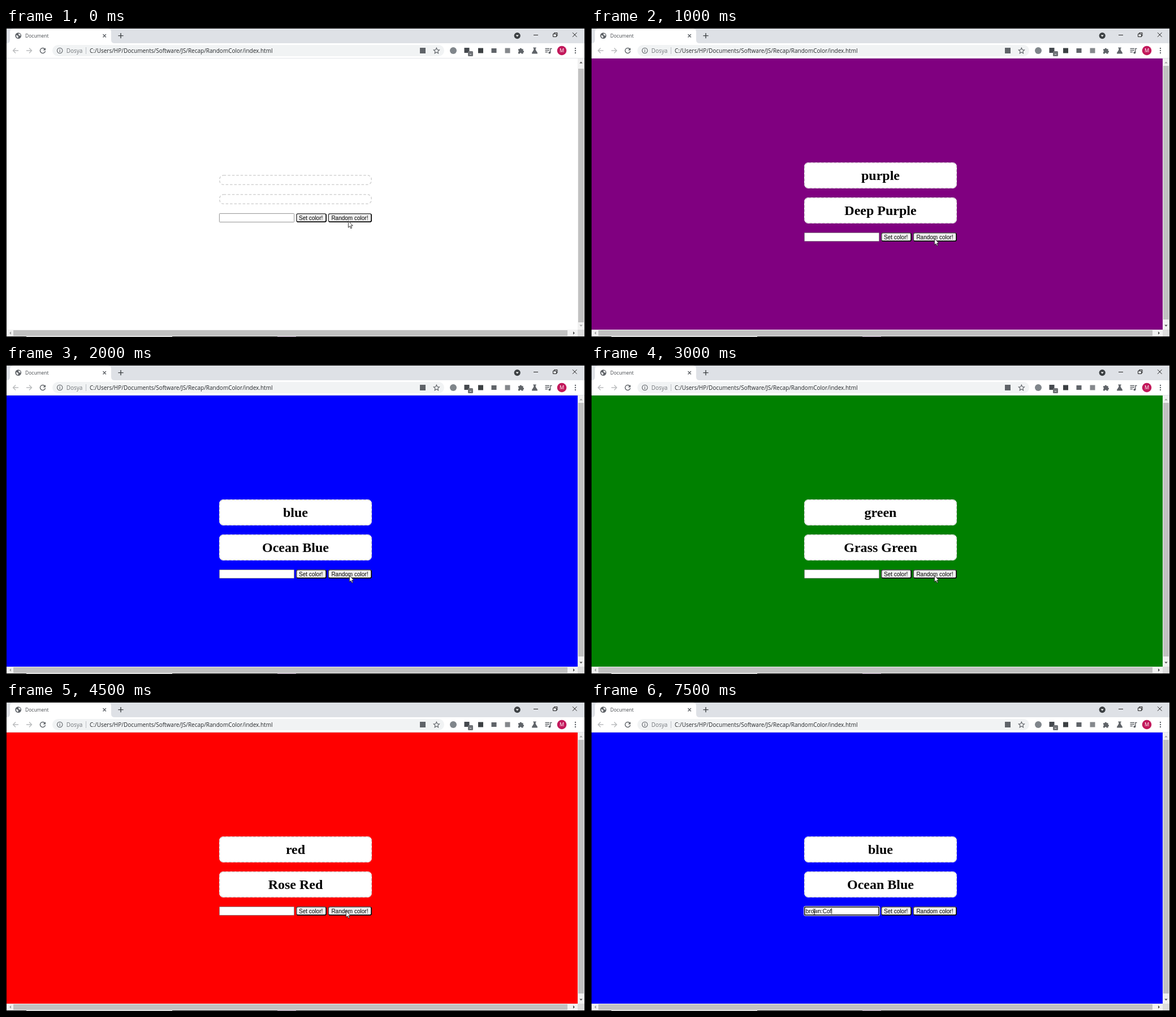
Recreate the animation shown at these times as an HTML page. Size 1024 by 547 pixels, loop 8 s.

```html
<!DOCTYPE html>
<html lang="en">
<head>
<meta charset="utf-8">
<title>Random color</title>
<style>
  html, body { margin: 0; width: 100%; height: 100%; overflow: hidden; background: #fff; }
  svg { display: block; width: 100%; height: 100%; }
  .ui { font-family: "Open Sans", "Noto Sans", sans-serif; }
  .control { font: 10px "Liberation Sans", Arial, sans-serif; }
  .heading { font: bold 24px "Liberation Serif", "Times New Roman", serif; text-anchor: middle; }
  .line { fill: none; stroke: #5f6368; stroke-width: 1.4; }
  .thin { fill: none; stroke: #222; stroke-width: 1; }
  .icon { fill: #5f6368; }
</style>
</head>
<body>
<svg viewBox="0 0 1024 547" preserveAspectRatio="none">
  <rect width="1024" height="547" fill="#fff"/>

  <!-- tab strip -->
  <g class="ui">
    <rect width="1024" height="27" fill="#dee1e6"/>
    <path d="M1 27q6 0 6-6V7q0-6 6-6H180q6 0 6 6V21q0 6 6 6Z" fill="#fff"/>
    <circle cx="21.7" cy="13.6" r="5.4" class="icon"/>
    <path d="M18 12.5l3 1.2 1 2-1.5 2-2-2ZM22 9.5l3.5 1.5v3l-3-1.2Z" fill="#fff"/>
    <text x="34" y="17" font-size="8.5" fill="#45494d">Document</text>
    <path d="M171.5 11l5.4 5.4m0-5.4l-5.4 5.4" class="line" stroke-width="1.2"/>
    <path d="M198.4 13.6h9.2M203 9v9.2" class="line" style="stroke:#3c4043"/>
    <circle cx="904.2" cy="13.6" r="5.6" fill="#3c4043"/>
    <path d="M901.6 12.4h5.2l-2.6 3Z" fill="#fff"/>
    <path d="M933 12.5h8M967.5 10.5h6v5h-6ZM969.5 10V8.500h5.500v5.500h-1.500M1002 8.200l7.600 7.600m0-7.600l-7.600 7.600" class="thin"/>
  </g>

  <!-- toolbar -->
  <g class="ui">
    <rect y="27" width="1024" height="27" fill="#fff"/>
    <rect y="53" width="1024" height="1" fill="#e3e5e8"/>
    <path id="arrow" d="M22 40H12.800M17 35.500L12.500 40l4.500 4.500" class="line" style="stroke:#babcbe"/>
    <use href="#arrow" transform="matrix(-1 0 0 1 58 0)"/>
    <path d="M68.700 37.300A4.600 4.600 0 1 0 69.500 41" class="line"/>
    <path d="M70 35v4.600h-4.600Z" class="icon"/>
    <rect x="82" y="30" width="693" height="20" rx="10" fill="#f1f3f4"/>
    <circle cx="95.200" cy="40" r="4.700" class="line" style="stroke-width:1.100"/>
    <path d="M95.200 39.300v3.400M95.200 37v1.200" class="line" style="stroke-width:1.200"/>
    <text x="106.700" y="43.600" font-size="10" fill="#72767a">Dosya</text>
    <path d="M141.500 34v12" stroke="#bdc1c6"/>
    <text x="148" y="43.600" font-size="10" fill="#25282b">C:/Users/HP/Documents/Software/JS/Recap/RandomColor/index.html</text>
    <rect x="732" y="35" width="10" height="10" class="icon"/>
    <path d="M761.400 35.200l1.500 3.300 3.600.4-2.700 2.400.8 3.500-3.200-1.800-3.200 1.800.8-3.500-2.700-2.400 3.600-.4Z" class="line" style="stroke-width:1.100"/>

    <circle cx="791" cy="40" r="6" fill="#80868b"/>
    <rect x="810.500" y="35" width="9" height="9" fill="#45494e"/>
    <rect x="817" y="41" width="9" height="9" rx="1.500" fill="#707377"/>
    <path d="M820 46.500h3" stroke="#d5d7d9"/>
    <rect x="835" y="35.500" width="9" height="9" fill="#3c4043"/>
    <rect x="858.500" y="36" width="9" height="8" class="icon"/>
    <rect x="882.500" y="35.500" width="9" height="9" fill="#85888c"/>
    <path d="M906 37.200h2.600a1.700 1.700 0 0 1 3.400 0h2.600v3a1.500 1.500 0 0 1 0 3v2.300h-3a1.500 1.500 0 0 0-3 0H906v-3a1.500 1.500 0 0 0 0-2.800Z" class="icon"/>
    <path d="M932.300 34.500h5.400v1.200h-1v3l3.300 5.300q.4 1.500-1 1.500h-8q-1.400 0-1-1.500l3.300-5.300v-3h-1Z" class="icon"/>
    <path d="M953.500 36.500h7.500M953.500 39.500h7.500M953.500 42.500h4.500M962.800 44V36.500h2.700" class="line"/>
    <circle cx="961.300" cy="43.700" r="1.900" class="icon"/>
    <circle cx="983" cy="40" r="8.300" fill="#c2185b"/>
    <text x="983" y="43.200" font-size="9" fill="#fff" text-anchor="middle">M</text>
    <g class="icon"><circle cx="1007" cy="36" r="1.200"/><circle cx="1007" cy="40" r="1.200"/><circle cx="1007" cy="44" r="1.200"/></g>
  </g>

  <!-- page -->
  <rect id="page" x="1" y="54" width="1010" height="480"/>
  <g id="boxes"></g>
  <g id="form" class="control">
    <rect x="377.400" y="328.400" width="132.200" height="15.200" rx="1" fill="#fff" stroke="#767676" stroke-width=".8"/>
    <g id="focus" fill="none">
      <rect x="376.700" y="327.700" width="133.800" height="16.600" rx="2" stroke="#fff"/>
      <rect x="377.900" y="328.900" width="131.200" height="14.200" rx="1.200" stroke="#101010" stroke-width="1.500"/>
    </g>
    <text id="typed" x="379.800" y="339.500"></text>
    <path id="caret" d="M0 331v10.500" stroke="#000" stroke-width=".8"/>
  </g>

  <!-- scrollbars -->
  <path d="M1011 54h12v492H1V534h1010Z" fill="#f1f1f1"/>
  <rect x="1011" y="534" width="12" height="12" fill="#dcdcdc"/>
  <rect id="thumb" x="1012" width="10" height="449" fill="#c1c1c1"/>
  <rect x="13" y="535" width="980" height="10" fill="#c1c1c1"/>
  <path id="up" d="M1014.300 62.500h5.400l-2.700-3Z"/>
  <path id="down" d="M1014.300 525.500h5.400l-2.700 3Z"/>
  <path d="M9 537.300v5.400l-3-2.700Z" fill="#a3a3a3"/>
  <path d="M1003 537.300v5.400l3-2.700Z" fill="#505050"/>

  <!-- window edge -->
  <path d="M0 .5H1024M.5 0V547M1023.500 0V547M0 546.500H1024" stroke="#000"/>
  <path d="M36 546.500H294" stroke="#c4c4c4"/>
  <path d="M480 546.500H513" stroke="#76607a"/>

  <path id="pointer" d="M.4.600V12.200L3 9.700l1.800 4.100 1.800-.8-1.800-4h3.500Z" fill="#fff" stroke="#000" stroke-width=".8"/>
  <path id="beam" d="M392.700 366.500h1.600l.7.600.7-.6h1.600M395 367v9.500M392.700 377h1.600l.7-.6.700.6h1.600" fill="none" stroke="#111" stroke-width=".9"/>
</svg>
<script>
const LOOP = 8000;
const NS = "http://www.w3.org/2000/svg";
const $ = id => document.getElementById(id);

function add(parent, tag, attrs, text = "") {
  const el = document.createElementNS(NS, tag);
  set(el, attrs);
  el.textContent = text;
  parent.append(el);
  return el;
}

function set(el, attrs) {
  for (const key in attrs) el.setAttribute(key, attrs[key]);
}

const show = (el, on) => set(el, { visibility: on ? "visible" : "hidden" });

// The last entry whose start time has passed.
const latest = (list, time) => list.filter(([at]) => at <= time).pop();

const pages = [
  [0, "white", "", ""],
  [1000, "purple", "purple", "Deep Purple"],
  [2000, "blue", "blue", "Ocean Blue"],
  [3000, "green", "green", "Grass Green"],
  [4500, "red", "red", "Rose Red"],
  [6000, "blue", "blue", "Ocean Blue"]
];
const moves = [[0, 605, 341], [1000, 607, 372], [3500, 604, 370], [4000, 601, 369]];
const presses = [[0, false], [500, true], [1000, false], [1500, true], [2000, false]];
const typing = [[0, ""], [6500, "b"], [7000, "brown"], [7500, "brown:Cof"]];

const boxes = [0, 1].map(() => ({
  frame: add($("boxes"), "rect", {
    x: 377.75, width: 268.5, rx: 7, fill: "#fff", stroke: "#d3d3d3",
    "stroke-width": 1.5, "stroke-dasharray": "4.5 3"
  }),
  back: add($("boxes"), "rect", { x: 377, width: 270, rx: 7.5, fill: "#fff" }),
  label: add($("boxes"), "text", { x: 512, class: "heading" })
}));
boxes.forEach(box => box.frame.before(box.back));

function makeButton(x, width, label, textX) {
  const left = x + 0.75, right = x + width - 0.75;
  const face = add($("form"), "rect", {
    x: left, y: 328.75, width: width - 1.5, height: 14.5, rx: 3, fill: "#efefef", "stroke-width": 1.5
  });
  const shade = add($("form"), "path", {
    d: `M${left + 1} 342.4q.8.850 2 .850H${right - 3}q3 0 3-3V331.750q0-1.200-.8-2`,
    fill: "none", "stroke-width": 1.5
  });
  add($("form"), "text", { x: textX, y: 339.5 }, label);
  return pressed => {
    set(face, { stroke: pressed ? "#000" : "#4c4c4c" });
    set(shade, { stroke: pressed ? "#4c4c4c" : "#000" });
  };
}

const setButton = makeButton(513, 54, "Set color!", 518);
const randomButton = makeButton(569.5, 77.5, "Random color!", 575.4);

function draw(time) {
  const [, color, ...labels] = latest(pages, time);
  const filled = labels[0] !== "";
  const focused = time >= 6000;
  const height = filled ? 46 : 18;

  set($("page"), { fill: color });
  boxes.forEach(({ frame, back, label }, i) => {
    const y = (filled ? 238 : 260) + i * (height + 16);
    set(back, { y, height });
    set(frame, { y: y + 0.75, height: height - 1.5 });
    set(label, { y: y + 31 });
    label.textContent = labels[i];
  });

  set($("form"), { transform: `translate(0 ${filled ? 34 : 0})` });
  setButton(false);
  randomButton(latest(presses, time)[1]);
  show($("focus"), focused);
  $("typed").textContent = latest(typing, time)[1];
  const caretX = 380.2 + $("typed").getComputedTextLength();
  set($("caret"), { transform: `translate(${caretX} 0)` });
  show($("caret"), focused);

  set($("thumb"), { y: filled ? 67 : 72 });
  set($("up"), { fill: filled ? "#a3a3a3" : "#505050" });
  set($("down"), { fill: filled ? "#505050" : "#a3a3a3" });

  const [, x, y] = latest(moves, time);
  set($("pointer"), { transform: `translate(${x} ${y})` });
  show($("pointer"), !focused);
  show($("beam"), focused);
}

const start = performance.now();
function tick() {
  draw((performance.now() - start) % LOOP);
  requestAnimationFrame(tick);
}
tick();
</script>
</body>
</html>
```
